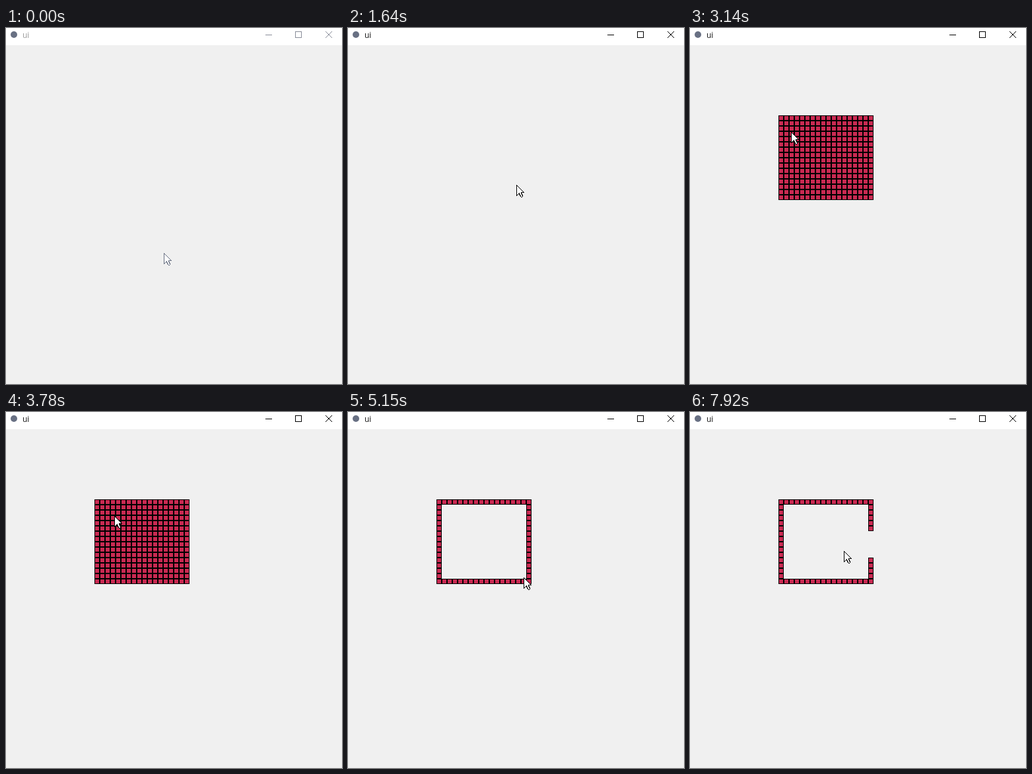
Write an HTML page that moves like this. It is 509x538 px and loops after 8000 ms.

```html
<!DOCTYPE html>
<html lang="en">
<head>
<meta charset="utf-8">
<title>Grid drawing</title>
<style>
  html, body { margin: 0; width: 100%; height: 100%; overflow: hidden; background: #f0f0f0; }
  svg { display: block; width: 509px; height: 538px; }
  text { font: 12px "Open Sans", "Noto Sans", sans-serif; fill: #999; }
  #buttons { fill: none; stroke: #898d99; }
  .active text { fill: #111; }
  .active #buttons { stroke: #000; }
</style>
</head>
<body>
<svg id="stage" viewBox="0 0 509 538">
  <defs>
    <pattern id="cell" x="134" y="132" width="8" height="8" patternUnits="userSpaceOnUse">
      <rect width="8" height="8"/>
      <rect x="1" y="1" width="6" height="6" fill="#c92a52"/>
    </pattern>
  </defs>
  <rect width="509" height="538" fill="#f0f0f0"/>
  <rect width="509" height="26" fill="#fff"/>
  <circle cx="12" cy="10" r="5" fill="#687083"/>
  <text x="25" y="15">ui</text>
  <g id="buttons">
    <path d="M393 10.5h10M438.5 5.5h9v9h-9z" shape-rendering="crispEdges"/>
    <path d="M484 5l10 10M494 5l-10 10"/>
  </g>
  <g shape-rendering="crispEdges">
    <rect id="block" x="134" y="132" width="144" height="128" fill="url(#cell)"/>
    <rect id="room" x="142" y="140" width="128" height="112" fill="#f0f0f0"/>
    <rect id="door" x="270" y="180" width="8" height="40" fill="#f0f0f0"/>
  </g>
  <g id="pointer">
    <circle id="click" cx="9" cy="9" r="29.5" fill="#ff0" fill-opacity=".5"/>
    <path id="arrow" fill="#fff" stroke="#000" shape-rendering="crispEdges"
      d="M.5 .5v16l4-4v1l2 4 1 1h1l1-1v-1l-2-4v-1h4z"/>
  </g>
</svg>
<script>
  const LOOP = 8000;
  const STEP = 125;
  const CLICK = 135;
  const $ = id => document.getElementById(id);

  // Pointer moves from wherever it is to (x, y), first and last step at these times.
  const moves = [
    { first: 130, last: 630, x: 150, y: 140 },
    { first: 880, last: 1000, x: 141, y: 140 },
    { first: 1260, last: 1390, x: 248, y: 228 },
    { first: 1640, last: 1890, x: 273, y: 259 },
    { first: 2510, last: 2640, x: 185, y: 176 },
    { first: 2880, last: 3140, x: 153, y: 157 },
    { first: 3390, last: 3390, x: 146, y: 146 },
    { first: 3780, last: 3780, x: 164, y: 157 },
    { first: 3905, last: 4530, x: 263, y: 247 },
    { first: 4650, last: 4900, x: 266, y: 250 },
    { first: 5410, last: 6040, x: 279, y: 183 },
    { first: 6425, last: 6790, x: 277, y: 216 },
    { first: 7920, last: 7920, x: 233, y: 210 }
  ];
  const clicks = [1130, 3640, 6290];

  // Half linear, half smoothstep.
  const ease = p => (p + p * p * (3 - 2 * p)) / 2;
  const mix = (a, b, p) => Math.round(a + (b - a) * p);

  function pointerAt(t) {
    let at = { x: 239, y: 340 };
    for (const move of moves) {
      if (t < move.first) break;
      const span = move.last - move.first;
      const count = Math.round(span / STEP) + 1;
      const done = t >= move.last ? count : 1 + Math.floor((t - move.first) / span * (count - 1));
      const p = ease(done / count);
      at = { x: mix(at.x, move.x, p), y: mix(at.y, move.y, p) };
    }
    return at;
  }

  const show = (id, visible) => $(id).setAttribute("visibility", visible ? "visible" : "hidden");

  function draw(t) {
    const { x, y } = pointerAt(t);
    $("pointer").setAttribute("transform", `translate(${x} ${y})`);
    $("arrow").setAttribute("stroke", t < moves[0].first ? "#687083" : "#000");
    $("stage").classList.toggle("active", t >= clicks[0]);
    show("click", clicks.some(start => t >= start && t < start + CLICK));
    show("block", t >= 2140);
    show("room", t >= 5150);
    show("door", t >= 7040);
  }

  const origin = performance.now();
  function tick() {
    draw((performance.now() - origin) % LOOP);
    requestAnimationFrame(tick);
  }
  tick();
</script>
</body>
</html>
```
